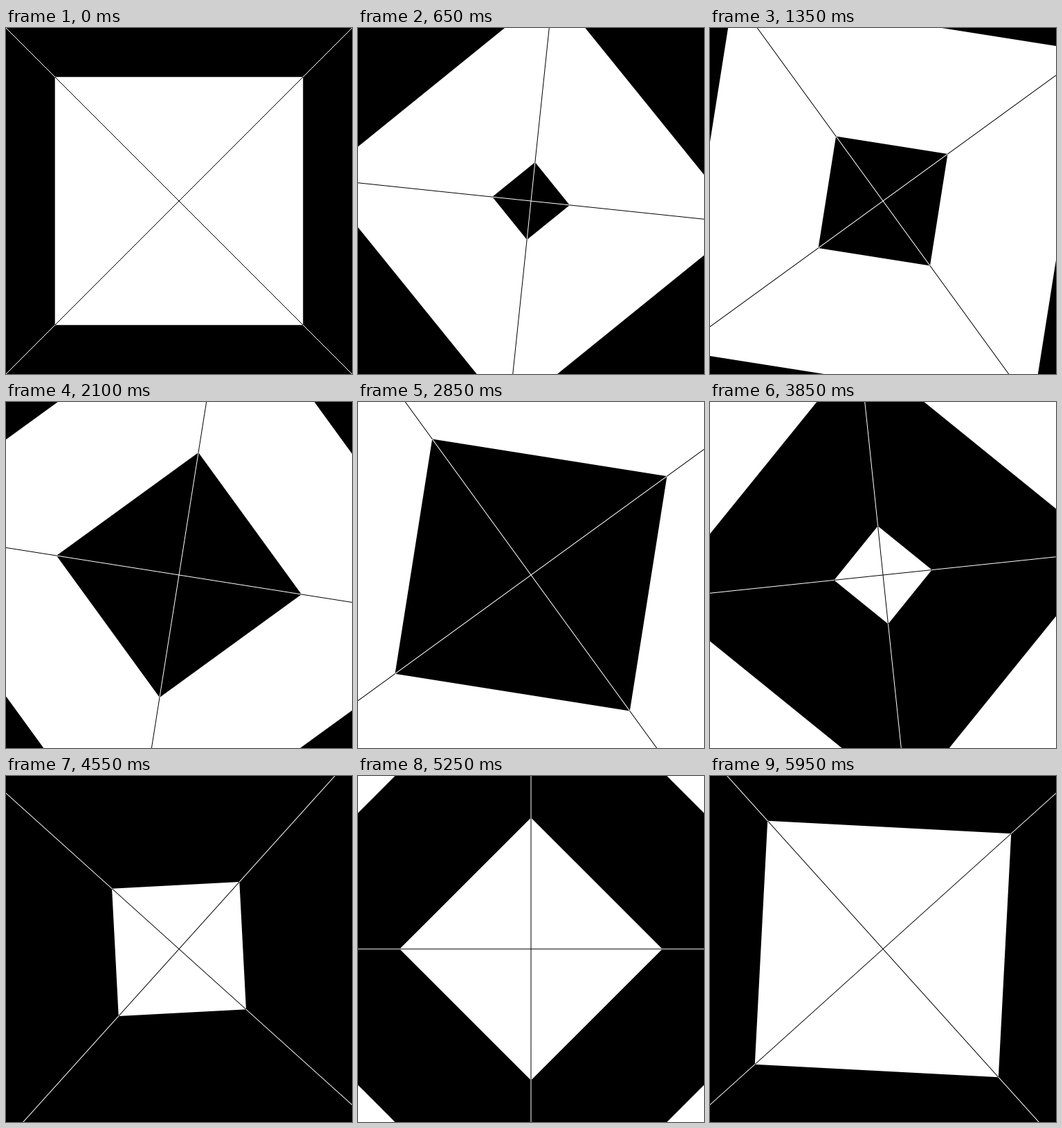
An HTML page with a canvas that plays this animation: 500 by 500 pixels, repeating every 6000 ms.

```html
<!DOCTYPE html>
<html lang="en">
<head>
<meta charset="utf-8">
<title>Turning squares</title>
<style>
  html, body { margin: 0; width: 100%; height: 100%; overflow: hidden; background: #000; }
  canvas { display: block; }
</style>
</head>
<body>
<canvas id="stage" width="500" height="500"></canvas>
<script>
const ctx = document.getElementById('stage').getContext('2d');
const STEP_MS = 50, STEPS = 120, HALF = STEPS / 2;
const GROWTH = 3;   // px added to half a side per step
const OUTLINE = 0.75; // black outline grows black squares and trims white ones
const start = performance.now();

function square(radius, white) {
  const r = radius + (white ? -OUTLINE : OUTLINE);
  ctx.fillStyle = white ? '#fff' : '#000';
  ctx.fillRect(-r, -r, 2 * r, 2 * r);
}

function diagonals() {
  const d = 300;
  ctx.globalCompositeOperation = 'difference';
  ctx.strokeStyle = '#fff';
  ctx.lineWidth = 1;
  ctx.beginPath();
  ctx.moveTo(-d, -d);
  ctx.lineTo(d, d);
  ctx.moveTo(d, -d);
  ctx.lineTo(-d, d);
  ctx.stroke();
}

function draw(step) {
  ctx.save();
  ctx.translate(250, 250);
  ctx.rotate(-2 * Math.PI * step / STEPS);
  // Nested squares of alternating colour, oldest and largest first
  const turn = Math.floor(step / HALF);
  for (let k = 2; k >= 0; k--) {
    const radius = GROWTH * (step % HALF + k * HALF);
    if (radius > 0) square(radius, (turn + k) % 2 === 1);
  }
  diagonals();
  ctx.restore();
}

function tick() {
  const elapsed = performance.now() - start;
  draw(Math.floor(elapsed / STEP_MS) % STEPS);
  requestAnimationFrame(tick);
}
tick();
</script>
</body>
</html>
```
